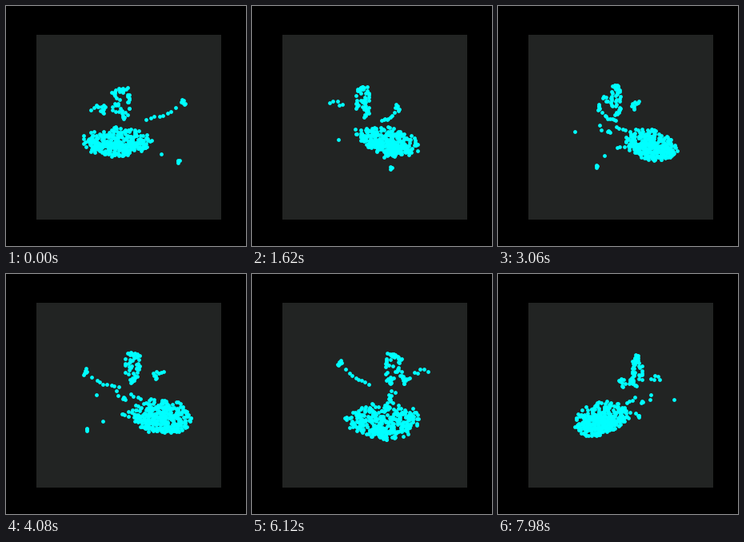
A matplotlib script that plays this animation: 300x300 px, repeating every 8000 ms.

```python
import numpy as np
import matplotlib.pyplot as plt
from matplotlib.animation import FuncAnimation
from matplotlib.patches import Rectangle

SIZE = 300
CX, CY = 158, 151      # screen position of the turning axis
TILT = 0.18            # vertical shift per unit of depth
DIST = 1200            # camera distance in pixels
LOOP, STEP = 8000, 20  # ms
TURN = 30              # ms per degree

rng = np.random.default_rng(11)

# All points are (x, depth, screen height) at angle zero.


def body(n):
    """Tilted ellipsoid, denser towards its underside."""
    d = rng.normal(size=(4 * n, 3))
    d /= np.linalg.norm(d, axis=1)[:, None]
    d *= rng.random((4 * n, 1)) ** 0.37
    d = d[rng.random(4 * n) < 0.6 + 0.4 * d[:, 2]][:n]
    u, w, v = d.T
    turn = np.radians(-10)
    x = -21 + 46 * u * np.cos(turn) - 34 * w * np.sin(turn)
    z = -30 + 46 * u * np.sin(turn) + 34 * w * np.cos(turn)
    y = 175.5 - 0.2 * (z + 30) + 19 * v
    return np.column_stack([x, z, y])


def tube(n, center, radii, top, bottom):
    """Points on the wall of an upright hollow tube."""
    a = rng.uniform(0, 2 * np.pi, n)
    return np.column_stack([center[0] + radii[0] * np.cos(a),
                            center[1] + radii[1] * np.sin(a),
                            np.linspace(top, bottom, n)])


def strand(n, start, end, jitter):
    """Points along a line, scattered by jitter."""
    t = np.linspace(0, 1, n)[:, None]
    line = np.array(start) + t * (np.array(end) - start)
    return line + rng.uniform(-1, 1, (n, 3)) * jitter


def clump(n, center, spread):
    return strand(n, center, center, spread)


points = np.vstack([
    body(335),
    # stem with its curled tip
    strand(15, (-7, 15, 100), (-24, 14, 107), 2),
    tube(27, (-14, 15), (11, 6), 107, 135),
    clump(3, (-11, 13, 137), 2),
    # long arm
    strand(8, (17, 8, 142), (53, 16, 127), (1, 1, 3)),
    clump(6, (62, 18, 117), (3, 1, 4)),
    # two short arms
    strand(5, (-50, 39, 123), (-36, 30, 124), (1, 1, 3)),
    strand(5, (-45, -10, 127), (-34, -4, 126), (1, 1, 1.5)),
    clump(4, (-35, -3, 133), (3, 3, 3)),
    # foot and lone outlier
    clump(4, (56, 22, 189), (2, 1, 3)),
    clump(1, (35, 17, 181), 0),
    clump(1, (4, 63, 159), 0),
    # loose links between stem and body
    strand(2, (-4, 33, 151), (-4, 31, 157), 0.5),
    clump(4, (-6, 22, 158.5), (2, 2, 2)),
    strand(4, (-9, 12, 153.5), (-16, 2, 158), 1),
    strand(5, (22, -17, 168), (10, 10, 173), (2, 4, 4)),
])


def project(deg):
    c, s = np.cos(np.radians(deg)), np.sin(np.radians(deg))
    px, pz, py = points.T
    depth = px * s + pz * c
    zoom = 1 / (1 - depth / DIST)
    x = CX + zoom * (px * c - pz * s)
    y = CY + zoom * (py - CY + TILT * depth)
    return x, y


fig = plt.figure(figsize=(3, 3), dpi=100, facecolor="black")
ax = fig.add_axes([0, 0, 1, 1])
ax.set_xlim(0, SIZE)
ax.set_ylim(SIZE, 0)
ax.axis("off")
ax.add_patch(Rectangle((38, 36), 231, 231, fc="#222423", lw=0))
dots, = ax.plot([], [], "o", color="cyan", ms=3.45, mew=0)


def draw(i):
    dots.set_data(*project(i * STEP // TURN))
    return dots,


anim = FuncAnimation(fig, draw, frames=LOOP // STEP, interval=STEP,
                     init_func=lambda: draw(0), blit=False,
                     repeat=True, repeat_delay=0)
plt.show()
```
